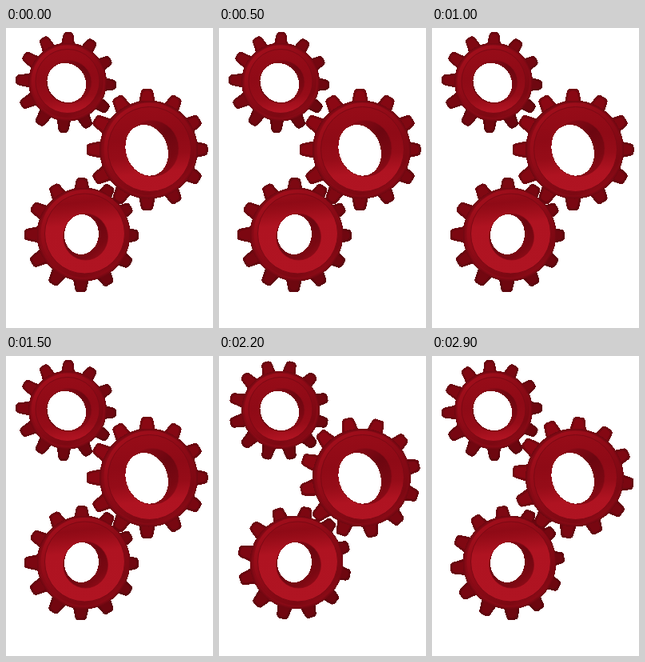
Write an HTML page that moves like this. It is 259x375 px and loops after 3 s.

```html
<!DOCTYPE html>
<html lang="en">
<head>
<meta charset="utf-8">
<title>Gears</title>
<style>
html, body { margin: 0; width: 100%; height: 100%; overflow: hidden; background: #fff; }
svg { display: block; width: 259px; height: 375px; }
</style>
</head>
<body>
<svg id="stage" viewBox="0 0 259 375">
  <defs>
    <radialGradient id="body">
      <stop offset="0.86" stop-color="#74070f"/>
      <stop offset="0.93" stop-color="#8a0a16"/>
      <stop offset="1" stop-color="#6d0710"/>
    </radialGradient>
    <linearGradient id="rim" x1="0.2" y1="0.1" x2="0.8" y2="0.95">
      <stop offset="0" stop-color="#a00e1b"/>
      <stop offset="0.45" stop-color="#8c0a16"/>
      <stop offset="0.85" stop-color="#7c0812"/>
      <stop offset="1" stop-color="#900b17"/>
    </linearGradient>
    <linearGradient id="wall" x1="0.2" y1="0" x2="0.9" y2="1">
      <stop offset="0" stop-color="#8c0a16"/>
      <stop offset="0.4" stop-color="#6c0610"/>
      <stop offset="0.75" stop-color="#7a0812"/>
      <stop offset="1" stop-color="#960c19"/>
    </linearGradient>
  </defs>
</svg>
<script>
const NS = "http://www.w3.org/2000/svg";
const TEETH = 12, STEP = 100, LOOP = 3000, TURN = 6;
const stage = document.getElementById("stage");
const defs = stage.querySelector("defs");

// body, face, front and hole are [cx, cy, rx, ry, tilt];
// shade is how far down the face the dark part reaches
const gears = [
  { x: 75, y: 68, tip: 63, phase: 3, dir: 1, light: 0, shade: 0.75,
    body: [77, 67.5, 49, 49], face: [77, 66.5, 43, 43],
    front: [78.5, 67.5, 28.5, 27], hole: [75.8, 68.5, 23.5, 25.5, -40] },
  { x: 94.3, y: 258.7, tip: 71.5, phase: 0.5, dir: 1, light: 0, shade: 0.18,
    body: [97, 258, 58.5, 58.5], face: [98.5, 257, 53, 53],
    front: [99.5, 261, 28, 29], hole: [94.5, 258, 21.5, 25, 5] },
  { x: 176.5, y: 152, tip: 76, phase: 0, dir: -1, light: 12, shade: 0.58,
    body: [178.5, 152, 61.5, 61.5], face: [179.5, 151.5, 55, 56],
    front: [183, 150.5, 33, 35], hole: [176.2, 152.8, 26, 32.5, -20] }
];

function add(parent, tag, attrs) {
  const el = document.createElementNS(NS, tag);
  for (const key in attrs) el.setAttribute(key, attrs[key]);
  return parent.appendChild(el);
}

function oval(parent, [cx, cy, rx, ry, tilt = 0], attrs) {
  const transform = `rotate(${tilt} ${cx} ${cy})`;
  return add(parent, "ellipse", { cx, cy, rx, ry, transform, ...attrs });
}

const grow = ([cx, cy, rx, ry], d) => [cx, cy, rx + d, ry + d];

// Tapered tooth pointing up, with rounded shoulders
function tooth(root, tip, base, top) {
  const y = -tip, s = 3.5;
  return `M${-base} ${-root} L${-top - 1} ${y + s} Q${-top} ${y} ${-top + s} ${y}` +
         `H${top - s} Q${top} ${y} ${top + 1} ${y + s} L${base} ${-root}Z`;
}

function faceFill(id, shade) {
  const fill = add(defs, "linearGradient", { id, x1: 0.45, y1: 0, x2: 0.55, y2: 1 });
  const stops = [[0, "#970c18"], [shade * 0.6, "#8f0a16"], [shade, "#960c18"],
                 [shade + 0.2, "#af1321"], [1, "#b01422"]];
  for (const [offset, color] of stops) add(fill, "stop", { offset, "stop-color": color });
  return `url(#${id})`;
}

function build(g, n) {
  const root = add(stage, "g", {});
  const wheel = add(root, "g", { transform: `translate(${g.x} ${g.y})` });
  const foot = g.body[2] - 7;
  const outer = tooth(foot, g.tip, g.tip * 0.15, g.tip * 0.088);
  const inner = tooth(foot, g.tip - 2.5, g.tip * 0.105, g.tip * 0.06);
  g.teeth = Array.from({ length: TEETH }, () => {
    const group = add(wheel, "g", {});
    return {
      group,
      side: add(group, "path", { d: outer, "shape-rendering": "crispEdges" }),
      top: add(group, "path", { d: inner })
    };
  });
  oval(root, g.body, { fill: "url(#body)", "shape-rendering": "crispEdges" });
  oval(root, grow(g.face, 2), { fill: "url(#rim)" });
  oval(root, grow(g.face, -3), { fill: faceFill("face" + n, g.shade), stroke: "#7c0914" });
  oval(root, g.front, { fill: "url(#wall)", stroke: "#8a0b17", "stroke-width": 0.8 });
  oval(root, g.hole, { fill: "#fff", "shape-rendering": "crispEdges" });
}

function red(v) {
  return `rgb(${Math.round(v)},${Math.round(v * 0.06)},${Math.round(v * 0.14)})`;
}

function draw(time) {
  const tick = Math.floor((time % LOOP) / STEP);
  for (const g of gears) {
    g.teeth.forEach((t, i) => {
      const angle = g.phase + i * 360 / TEETH + g.dir * TURN * tick;
      // light comes from the upper left
      const lit = Math.cos((angle + 40) * Math.PI / 180);
      t.group.setAttribute("transform", `rotate(${angle})`);
      t.side.setAttribute("fill", red(100 + g.light * 0.7 + 8 * lit));
      t.top.setAttribute("fill", red(118 + g.light + 10 * lit));
    });
  }
}

gears.forEach(build);
const start = performance.now();
function loop() {
  draw(performance.now() - start);
  requestAnimationFrame(loop);
}
loop();
</script>
</body>
</html>
```
